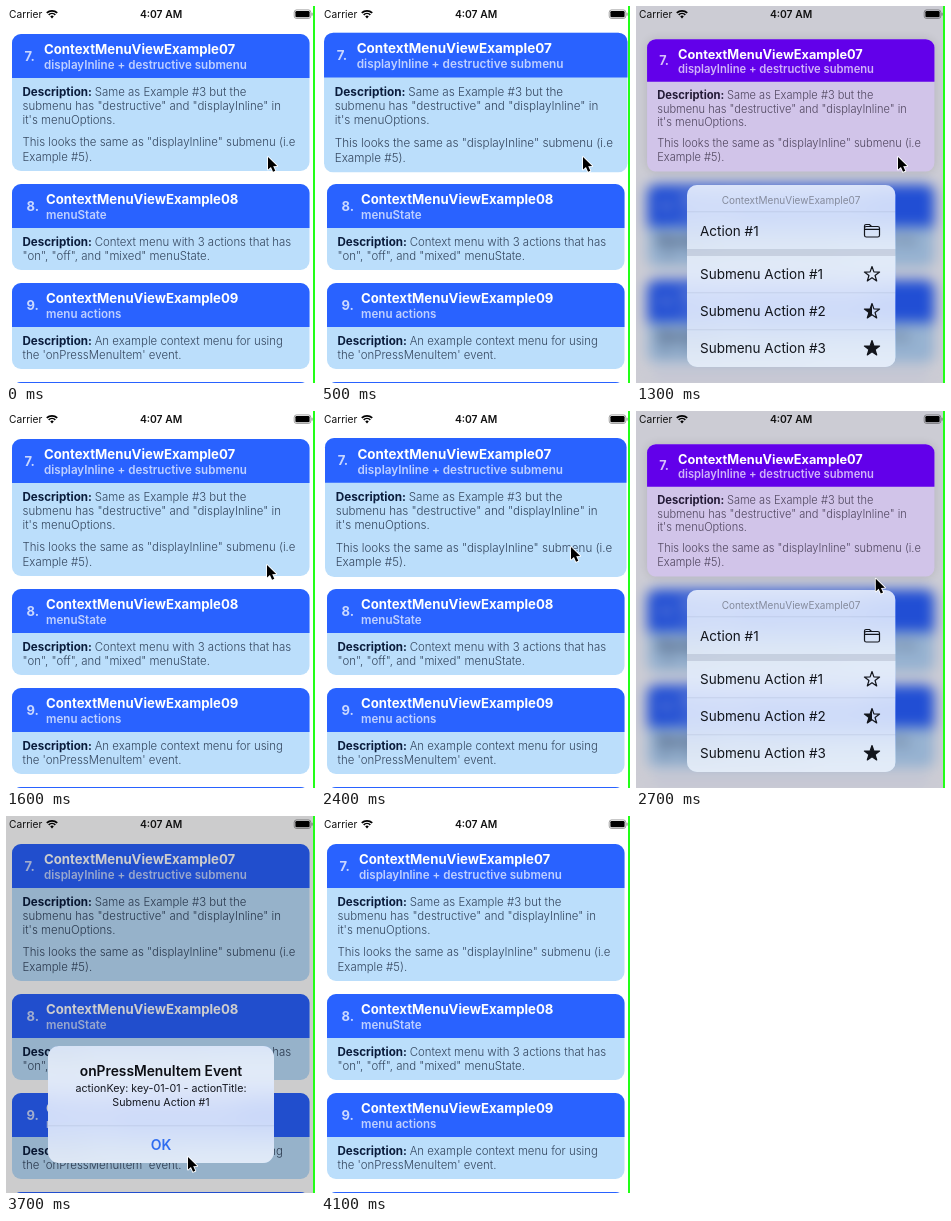
Animation of 309 by 377 pixels, one loop 4790 ms. Source, as an HTML page with a canvas:

```html
<!DOCTYPE html>
<html lang="en">
<head>
<meta charset="utf-8">
<title>Context menu demo</title>
<style>
  html, body { margin: 0; width: 100%; height: 100%; overflow: hidden; background: #fff; }
  canvas { display: block; }
</style>
</head>
<body>
<canvas id="stage" width="309" height="377"></canvas>
<script>
const W = 309, H = 377, LOOP = 4790, STEP = 100, MID = 155;
const stage = document.getElementById('stage').getContext('2d');
const sceneCanvas = document.createElement('canvas');
sceneCanvas.width = W;
sceneCanvas.height = H;
const scene = sceneCanvas.getContext('2d');

const BLUE = { head: '#2962ff', body: '#bbdefb', strong: '#0a1c3c', text: '#34465e' };
const PURPLE = { head: '#6200ea', body: '#d1c4e9', strong: '#231a36', text: '#50465f' };

const CARDS = [
  { y: 28, h: 137, no: '7.', title: 'ContextMenuViewExample07', titleX: 38,
    sub: 'displayInline + destructive submenu',
    lines: [[62, 'Same as Example #3 but the'],
            [76, 'submenu has "destructive" and "displayInline" in'],
            [90, "it's menuOptions."],
            [112, 'This looks the same as "displayInline" submenu (i.e'],
            [126.5, 'Example #5).']] },
  { y: 178, h: 86, no: '8.', title: 'ContextMenuViewExample08', titleX: 40, sub: 'menuState',
    lines: [[61.5, 'Context menu with 3 actions that has'],
            [75.5, '"on", "off", and "mixed" menuState.']] },
  { y: 277, h: 86, no: '9.', title: 'ContextMenuViewExample09', titleX: 40, sub: 'menu actions',
    lines: [[61.5, 'An example context menu for using'],
            [75.5, "the 'onPressMenuItem' event."]] },
  { y: 376, h: 86, no: '', title: '', titleX: 40, sub: '', lines: [] }
];

// Tracks are [time, ...values] keys joined by straight lines.
const OPEN = [[500, 0], [700, 1], [1300, 1], [1400, .5], [1500, .12], [1600, 0],
              [2500, 0], [2700, 1], [3100, 1], [3200, .5], [3300, .12], [3400, 0]];
const PRESS = [[200, 0], [500, .02], [700, 0], [2200, 0], [2500, .02], [2700, 0]];
const ALERT = [[3300, 0], [3400, .35], [3500, .85], [3600, 1], [3700, 1], [3800, .6], [3900, .2], [4000, 0]];
const POINTER = [[1400, 262, 151], [1600, 261, 154], [1800, 260, 152], [2000, 258, 148], [2300, 250, 136],
                 [2600, 250, 136], [3000, 209, 263], [3200, 208, 263], [3600, 182, 341]];

function track(keys, t) {
  const next = keys.findIndex(k => k[0] > t);
  if (next === 0) return keys[0].slice(1);
  if (next < 0) return keys[keys.length - 1].slice(1);
  const a = keys[next - 1], b = keys[next];
  const u = (t - a[0]) / (b[0] - a[0]);
  return a.slice(1).map((v, i) => v + (b[i + 1] - v) * u);
}

function label(c, text, x, y, size, weight, color, align = 'left') {
  c.font = `${weight} ${size}px Inter, "Open Sans", sans-serif`;
  c.fillStyle = color;
  c.textAlign = align;
  c.fillText(text, x, y);
}

function roundRect(c, x, y, w, h, r) {
  c.beginPath();
  c.roundRect(x, y, w, h, r);
}

function scaleAt(c, x, y, s) {
  c.translate(x, y);
  c.scale(s, s);
  c.translate(-x, -y);
}

function drawCard(c, card, colors, shadow = 0) {
  c.save();
  c.translate(0, card.y);
  if (shadow > 0) {
    c.shadowColor = `rgba(0,0,0,${.12 * shadow})`;
    c.shadowBlur = 10;
  }
  c.fillStyle = colors.body;
  roundRect(c, 6, 0, 297.5, card.h, 9);
  c.fill();
  c.shadowColor = 'transparent';
  c.fillStyle = colors.head;
  roundRect(c, 6, 0, 297.5, 44, [9, 9, 0, 0]);
  c.fill();
  label(c, card.no, card.titleX - 19.5, 27, 13, 700, 'rgba(255,255,255,.75)');
  label(c, card.title, card.titleX, 20.3, 13.2, 700, '#fff');
  label(c, card.sub, card.titleX, 35, 11.6, 600, 'rgba(255,255,255,.7)');
  card.lines.forEach(([y, text], i) => {
    let x = 16.5;
    if (i === 0) {
      label(c, 'Description: ', x, y, 11.6, 700, colors.strong);
      x += c.measureText('Description: ').width;
    }
    label(c, text, x, y, 11.45, 300, colors.text);
  });
  c.restore();
}

function drawScene(lifted) {
  scene.fillStyle = '#fff';
  scene.fillRect(0, 0, W, H);
  CARDS.slice(lifted ? 1 : 0).forEach(card => drawCard(scene, card, BLUE));
}

function drawBlurred(radius) {
  stage.save();
  if (radius > 0) stage.filter = `blur(${radius}px)`;
  stage.drawImage(sceneCanvas, 0, 0);
  stage.restore();
}

// The page shrinks a little and blurs while the menu is open.
function drawBackdrop(open) {
  stage.fillStyle = '#fff';
  stage.fillRect(0, 0, W, H);
  stage.save();
  scaleAt(stage, MID, H / 2, 1 - .035 * open);
  drawBlurred(6.5 * open);
  stage.restore();
  dim(.2 * open, '0,4,40');
}

function dim(amount, rgb) {
  stage.fillStyle = `rgba(${rgb},${amount})`;
  stage.fillRect(0, 0, W, H);
}

// Frosted glass: a blurred copy of the scene under a pale veil.
function drawGlass(x, y, w, h, r) {
  stage.save();
  roundRect(stage, x, y, w, h, r);
  stage.clip();
  drawBlurred(14);
  stage.fillStyle = 'rgba(232,237,248,.84)';
  stage.fillRect(x, y, w, h);
  stage.restore();
}

function hairline(x, y, w, h = .7) {
  stage.fillStyle = 'rgba(60,70,100,.15)';
  stage.fillRect(x, y, w, h);
}

function starPath(x, y) {
  stage.beginPath();
  for (let i = 0; i < 10; i++) {
    const r = i % 2 ? 3.2 : 8;
    const a = -Math.PI / 2 + i * Math.PI / 5;
    stage.lineTo(x + r * Math.cos(a), y + r * Math.sin(a));
  }
  stage.closePath();
}

function drawStar(x, y, fill) {
  stage.save();
  stage.lineJoin = 'round';
  starPath(x, y);
  stage.stroke();
  stage.clip();
  stage.fillRect(x - 9, y - 9, 18 * fill, 18);
  stage.restore();
}

function drawFolder(x, y) {
  roundRect(stage, x - 7.5, y - 4.5, 15, 10.5, 1.8);
  stage.moveTo(x - 7.5, y - 2);
  stage.lineTo(x - 7.5, y - 5);
  stage.quadraticCurveTo(x - 7.5, y - 6.5, x - 6, y - 6.5);
  stage.lineTo(x - 2.5, y - 6.5);
  stage.lineTo(x - .5, y - 4.5);
  stage.moveTo(x - 7.5, y - 1.7);
  stage.lineTo(x + 7.5, y - 1.7);
  stage.stroke();
}

function drawMenu(open) {
  stage.save();
  stage.globalAlpha = Math.min(1, open * 1.5);
  scaleAt(stage, MID, 160.5, .35 + .65 * open);
  drawGlass(51, 179, 208.5, 182, 10);
  label(stage, 'ContextMenuViewExample07', MID, 197.5, 10, 400, '#858b9c', 'center');
  hairline(51, 205.5, 208.5);
  hairline(51, 243, 208.5, 7);
  hairline(51, 286.5, 208.5);
  hairline(51, 323.5, 208.5);
  label(stage, 'Action #1', 64, 230, 13.5, 400, '#12151c');
  for (let i = 1; i <= 3; i++) {
    label(stage, `Submenu Action #${i}`, 64, 236 + 37 * i, 13.5, 400, '#12151c');
  }
  stage.strokeStyle = stage.fillStyle = '#12151c';
  stage.lineWidth = 1.2;
  drawFolder(236, 225);
  for (let i = 0; i < 3; i++) drawStar(236, 268.5 + 37 * i, i / 2);
  stage.restore();
}

function drawAlert(alpha, scale) {
  stage.save();
  stage.globalAlpha = alpha;
  scaleAt(stage, MID, 288.5, scale);
  drawGlass(42, 230, 226, 117, 11);
  label(stage, 'onPressMenuItem Event', MID, 259.5, 13.8, 600, '#0c0e14', 'center');
  label(stage, 'actionKey: key-01-01 - actionTitle:', MID, 276, 10.7, 400, '#14171f', 'center');
  label(stage, 'Submenu Action #1', MID, 290, 10.7, 400, '#14171f', 'center');
  hairline(42, 309.5, 226);
  label(stage, 'OK', MID, 334, 14, 600, '#2f6df0', 'center');
  stage.restore();
}

function drawStatusBar() {
  label(stage, 'Carrier', 3, 12, 10.2, 400, '#111');
  label(stage, '4:07 AM', MID, 12, 10.3, 600, '#111', 'center');
  stage.save();
  stage.strokeStyle = stage.fillStyle = '#000';
  stage.lineWidth = 1.7;
  for (const r of [4.7, 7.4]) {
    stage.beginPath();
    stage.arc(46, 12.2, r, -Math.PI * .75, -Math.PI * .25);
    stage.stroke();
  }
  stage.beginPath();
  stage.moveTo(46, 12.5);
  stage.arc(46, 12.2, 2.5, -Math.PI * .75, -Math.PI * .25);
  stage.fill();
  roundRect(stage, 289.4, 5.1, 14.2, 6.2, 1.2);
  stage.fill();
  stage.strokeStyle = stage.fillStyle = 'rgba(0,0,0,.45)';
  stage.lineWidth = .8;
  roundRect(stage, 288.2, 3.9, 16.6, 8.6, 2.4);
  stage.stroke();
  stage.fillRect(305.6, 6.8, 1, 2.8);
  stage.restore();
}

function drawPointer(x, y) {
  stage.save();
  stage.translate(x, y);
  stage.scale(.87, .87);
  stage.beginPath();
  for (const [px, py] of [[0, 0], [0, 14.5], [3.4, 11.4], [5.8, 17], [8.4, 15.9], [6, 10.5], [10.5, 10.3]]) {
    stage.lineTo(px, py);
  }
  stage.closePath();
  stage.strokeStyle = '#fff';
  stage.lineWidth = 2;
  stage.lineJoin = 'round';
  stage.stroke();
  stage.fillStyle = '#000';
  stage.fill();
  stage.restore();
}

function draw(t) {
  const [open] = track(OPEN, t);
  const [press] = track(PRESS, t);
  const [alert] = track(ALERT, t);
  const lifted = open > 0 || press > 0;

  drawScene(lifted);
  drawBackdrop(open);

  if (lifted) {
    stage.save();
    stage.translate(0, 2.8 * Math.sqrt(open));
    scaleAt(stage, MID, 96.5, 1 + press - .034 * open);
    drawCard(stage, CARDS[0], open === 1 ? PURPLE : BLUE, open);
    stage.restore();
  }
  if (open > 0) drawMenu(open);
  if (alert > 0) {
    dim(.2 * alert, '0,0,8');
    drawAlert(alert, t < 3700 ? 1 + .15 * (1 - alert) : 1);
  }

  drawStatusBar();
  stage.fillStyle = '#22ff18';
  stage.fillRect(307, 0, 2, H);
  if (t < 4100) drawPointer(...track(POINTER, t));
}

function tick() {
  const t = performance.now() % LOOP;
  draw(Math.floor(t / STEP) * STEP);
  requestAnimationFrame(tick);
}
tick();
</script>
</body>
</html>
```
